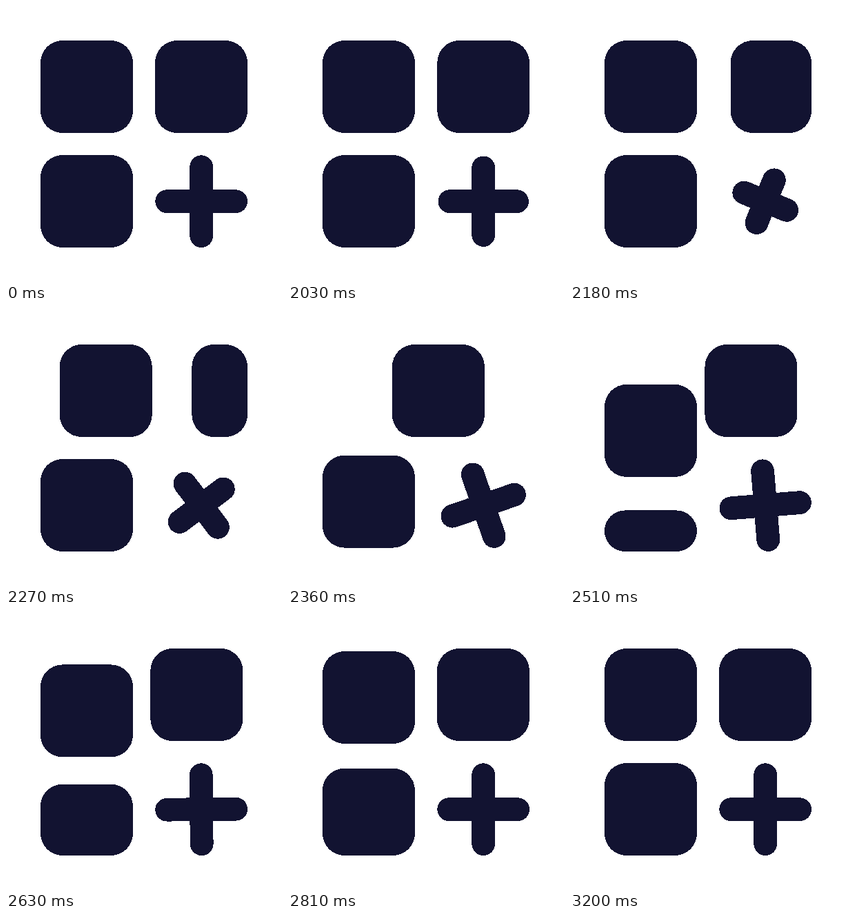
These frames come from a looping animation (400x400 px, 3.26 s). An HTML page:

```html
<!DOCTYPE html>
<html lang="en">
<head>
<meta charset="utf-8">
<title>Add tile</title>
<style>
  html, body { margin: 0; width: 100%; height: 100%; overflow: hidden; background: #fff; }
  svg { display: block; width: 100%; height: 100%; shape-rendering: crispEdges; }
</style>
</head>
<body>
<svg viewBox="0 0 400 400" fill="#121331">
  <rect id="leaving"/>
  <rect id="across"/>
  <rect id="up"/>
  <rect id="entering"/>
  <path id="plus" fill="none" stroke="#121331" stroke-width="33.8" stroke-linecap="round"/>
</svg>
<script>
const LOOP = 3260, HOLD = 2000, STEP = 30, LAST_STEP = 40;
const SIZE = 134, NEAR = 50, FAR = 216, EDGE = 350, RADIUS = 32;
const CENTER = 283.2;

// Cubic bezier easing with control points (x1, 0) and (x2, 1)
const bezier = (x1, x2) => x => {
  if (x <= 0) return 0;
  if (x >= 1) return 1;
  let lo = 0, hi = 1, s;
  for (let i = 0; i < 30; i++) {
    s = (lo + hi) / 2;
    const u = 1 - s;
    if (3 * u * u * s * x1 + 3 * u * s * s * x2 + s ** 3 < x) lo = s;
    else hi = s;
  }
  return s * s * (3 - 2 * s);
};

const glide = bezier(0.3, 0);
const rush = bezier(1, 0.83);
const smooth = bezier(1 / 3, 2 / 3);
const settle = bezier(0.33, 0.25);
const turn = bezier(0.23, 0.15);

const mix = (a, b, p) => a + (b - a) * p;
const span = (n, start, length) => (n - start) / length;

function set(id, attributes) {
  const el = document.getElementById(id);
  for (const name in attributes) el.setAttribute(name, attributes[name]);
}

function tile(id, x, y, width = SIZE, height = SIZE) {
  set(id, { x, y, width, height, rx: Math.min(RADIUS, width / 2, height / 2) });
}

function draw(n) {
  const width = SIZE * (1 - rush(span(n, 0, 11.8)));
  const height = SIZE * glide(span(n, 11.8, 23.7));
  tile("leaving", EDGE - width, NEAR, width);
  tile("across", mix(NEAR, FAR, glide(span(n, 5.8, 22))), NEAR);
  tile("up", NEAR, mix(FAR, NEAR, glide(span(n, 10.25, 22.2))));
  tile("entering", NEAR, EDGE - height, SIZE, height);

  const arm = n < 6
    ? mix(50, 33.4, smooth(span(n, 0, 6)))
    : mix(33.4, 50, settle(span(n, 6, 10.5)));
  const angle = 90 * turn(span(n, 2.5, 20.8));
  set("plus", {
    d: `M${-arm} 0H${arm}M0 ${-arm}V${arm}`,
    transform: `translate(${CENTER} ${CENTER}) rotate(${angle})`
  });
}

function frame() {
  const t = performance.now() % LOOP;
  const n = Math.floor((t - HOLD) / STEP);
  draw(Math.max(0, Math.min(LAST_STEP, n)));
  requestAnimationFrame(frame);
}
frame();
</script>
</body>
</html>
```
